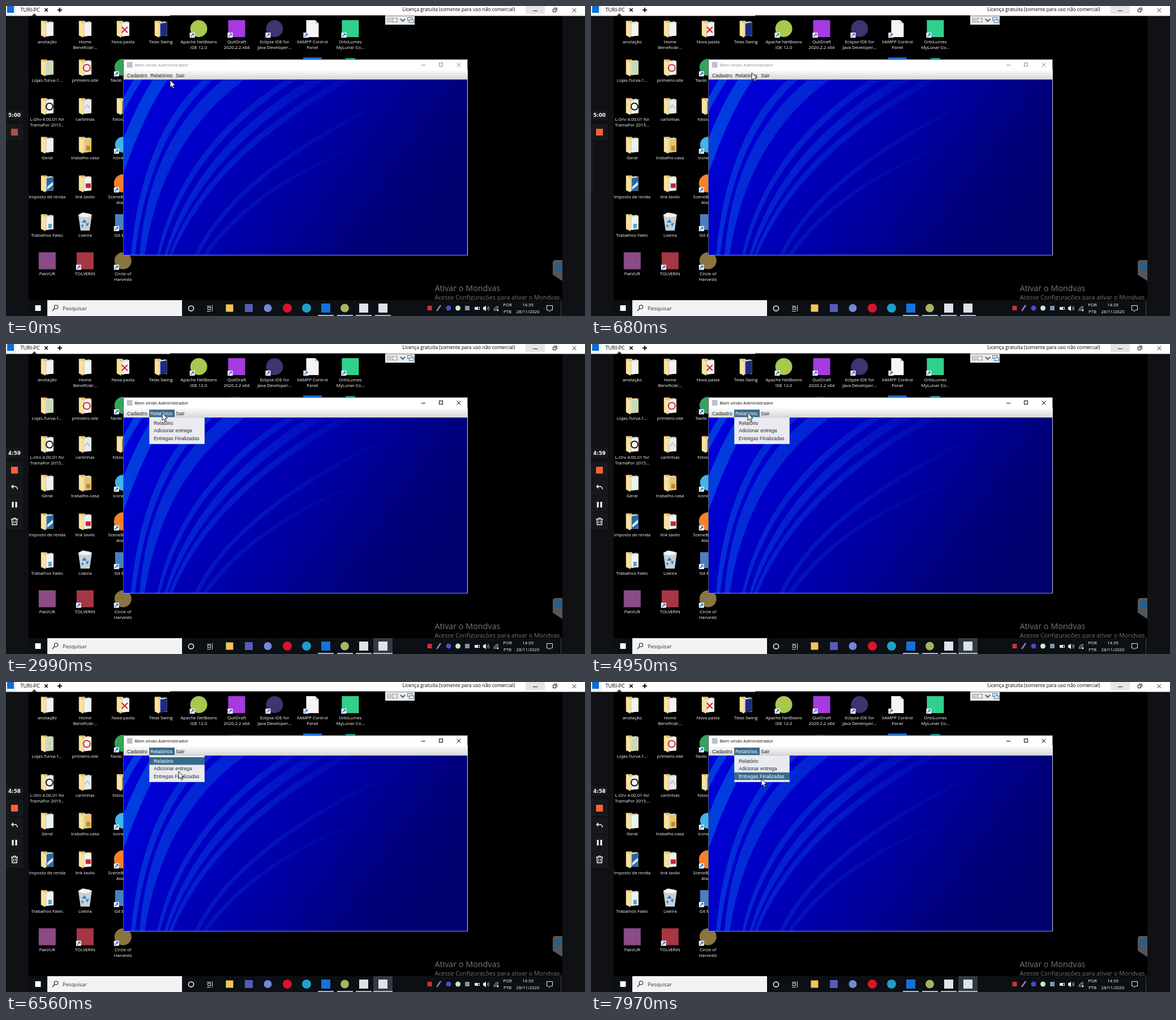
Write an HTML page with a canvas that moves like this. It is 1023 px wide and 548 px high and loops after 8 s.

```html
<!DOCTYPE html>
<html lang="pt-BR">
<head>
<meta charset="utf-8">
<title>Área de trabalho</title>
<style>
html, body { margin: 0; width: 100%; height: 100%; overflow: hidden; background: #000; }
canvas { display: block; }
</style>
</head>
<body>
<canvas id="stage" width="1023" height="548"></canvas>
<script>
const W = 1023, H = 548, LOOP = 8000;
const UI = '"Open Sans", "Noto Sans", sans-serif';
const SWING = '"Liberation Sans", Arial, sans-serif';
const screen = document.getElementById('stage').getContext('2d');
const desk = document.createElement('canvas');
desk.width = W;
desk.height = H;
let g = desk.getContext('2d');

// Drawing helpers
function rect(x, y, w, h, c) { g.fillStyle = c; g.fillRect(x, y, w, h); }
function disc(x, y, r, c) { g.fillStyle = c; g.beginPath(); g.arc(x, y, r, 0, 7); g.fill(); }
function ring(x, y, r, c, w = 1) {
  g.strokeStyle = c; g.lineWidth = w;
  g.beginPath(); g.arc(x, y, r, 0, 7); g.stroke();
}
function trace(pts) {
  g.beginPath();
  for (let i = 0; i < pts.length; i += 2) g.lineTo(pts[i], pts[i + 1]);
}
function poly(pts, c) { trace(pts); g.closePath(); g.fillStyle = c; g.fill(); }
function line(pts, c, w = 1) { trace(pts); g.strokeStyle = c; g.lineWidth = w; g.stroke(); }
function box(x, y, w, h, c) { g.strokeStyle = c; g.lineWidth = 1; g.strokeRect(x, y, w, h); }
function text(s, x, y, size, c, font = UI, align = 'left', weight = 400) {
  g.font = `${weight} ${size}px ${font}`;
  g.textAlign = align;
  g.fillStyle = c;
  g.fillText(s, x, y);
}
function square(x, y, r, c) { rect(x - r, y - r, 2 * r, 2 * r, c); }
function cross(x, y, r, c, w = 1) {
  line([x - r, y - r, x + r, y + r], c, w);
  line([x + r, y - r, x - r, y + r], c, w);
}

// Desktop icons
const colX = c => 72.8 + c * 66.95;
const rowY = r => 40 + r * 68.4;

function label(c, r, ...lines) {
  lines.forEach((s, i) => text(s, colX(c), rowY(r) + 26 + i * 10, 7.8, '#fff', UI, 'center', 500));
}
function shortcut(x, y) {
  rect(x - 16, y + 7, 9, 9, '#f4f6f8');
  line([x - 14, y + 14, x - 10, y + 10], '#1768c4', 1.5);
  poly([x - 12.5, y + 8.5, x - 8.5, y + 8.5, x - 8.5, y + 12.5], '#1768c4');
}
function folder(c, r, paper, mark, ...lines) {
  const x = colX(c), y = rowY(r);
  poly([x - 10, y - 14, x - 1, y - 14, x + 1, y - 12, x + 11, y - 12, x + 11, y + 13, x - 10, y + 13], '#e3bf63');
  poly([x - 3, y - 11, x + 8, y - 13, x + 8, y + 12, x - 3, y + 14], '#d5d8da');
  poly([x - 1, y - 9, x + 11, y - 11, x + 11, y + 12, x - 1, y + 14], paper);
  poly([x - 11, y - 14, x - 3, y - 9, x - 3, y + 16, x - 11, y + 12], '#fbe29a');
  if (mark) mark(x, y);
  label(c, r, ...lines);
}
function app(c, r, shape, size, color, ...lines) {
  const x = colX(c), y = rowY(r);
  shape(x, y, size, color);
  shortcut(x, y);
  label(c, r, ...lines);
}
function bin(x, y) {
  poly([x - 12, y - 13, x + 12, y - 13, x + 8, y + 15, x - 8, y + 15], '#c9d0d4');
  poly([x - 12, y - 13, x - 4, y - 17, x + 7, y - 15, x + 12, y - 13, x + 7, y - 9, x - 7, y - 9], '#f1f3f4');
  poly([x - 6, y + 1, x - 1, y - 5, x + 3, y + 1], '#2f83cf');
  poly([x + 1, y + 3, x + 7, y + 1, x + 4, y + 8], '#2f83cf');
  poly([x - 7, y + 4, x - 2, y + 6, x - 5, y + 10], '#2f83cf');
}

function drawIcons() {
  const paper = '#f3f3ef';
  folder(0, 0, paper, null, 'anotação');
  folder(1, 0, paper, null, 'Home', 'Beneficiár...');
  folder(2, 0, paper, (x, y) => cross(x + 3, y + 2, 5, '#d3202a', 2), 'Nova pasta');
  folder(3, 0, '#1c2c82', null, 'Telas Swing');
  folder(0, 1, '#c9d9b8', null, 'Lojas-Turva-1...');
  folder(1, 1, paper, (x, y) => ring(x + 3, y + 1, 6, '#cf2a3c', 2), 'primeiro-site');
  folder(0, 2, '#f5f5f5', (x, y) => ring(x + 4, y + 1, 6, '#161616', 2), 'L-Orv 4.00.01 for', 'TramaFor 2015...');
  folder(1, 2, '#e9ebec', (x, y) => line([x, y + 4, x + 4, y - 2, x + 9, y + 5], '#8b9296'), 'cartinhas');
  folder(2, 2, '#4c4a42', null, 'fotos casa');
  folder(0, 3, '#e9f4f1', null, 'Geral');
  folder(1, 3, '#eac46a', (x, y) => rect(x + 2, y + 2, 7, 8, '#b98b35'), 'trabalho-casa');
  folder(0, 4, '#2668a8', (x, y) => poly([x, y + 6, x + 10, y - 3, x + 10, y + 3, x, y + 11], '#dce9f3'), 'Imposto de renda');
  folder(1, 4, paper, (x, y) => rect(x + 1, y, 9, 8, '#c72534'), 'link tavilo');
  folder(0, 5, '#eef3f5', (x, y) => rect(x + 2, y + 3, 6, 8, '#5ca3c4'), 'Trabalhos Fatec');
  bin(colX(1), rowY(5));
  label(1, 5, 'Lixeira');

  app(4, 0, disc, 15, '#a9c84f', 'Apache NetBeans', 'IDE 12.0');
  app(5, 0, square, 15, '#a53be0', 'QuilDraft', '2020.2.2 x64');
  app(6, 0, disc, 15, '#3d3470', 'Eclipse IDE for', 'Java Developer...');
  const px = colX(7), py = rowY(0);
  poly([px - 11, py - 15, px + 5, py - 15, px + 11, py - 9, px + 11, py + 15, px - 11, py + 15], '#f5f5f5');
  poly([px + 5, py - 15, px + 11, py - 9, px + 5, py - 9], '#c8c8c8');
  shortcut(px, py);
  label(7, 0, 'XAMPP Control', 'Panel');
  app(8, 0, square, 15, '#31d08c', 'OrbiLumes', 'MyLunar Co...');

  app(2, 1, disc, 15, '#35a35a', 'Tavilo Linker');
  app(2, 3, disc, 14, '#43b4e8', 'icones-sis');
  app(2, 4, disc, 16, '#f5822a', 'SceneBuilder -', 'Atalho');
  app(2, 5, square, 14, '#4c7fc0', 'Git Bash');
  square(colX(0), rowY(6), 15, '#8a4b86');
  label(0, 6, 'PakVUR');
  app(1, 6, square, 15, '#a53743', 'TOLVERIN');
  app(2, 6, disc, 15, '#8a7440', 'Circle of', 'Harvests');

  rect(396, 93, 18, 2, '#333');
  rect(525, 91, 33, 4, '#1d6fd0');
  rect(600, 92, 17, 3, '#19a9a6');
}

function drawTopBar() {
  rect(0, 0, W, 17.5, '#fff');
  rect(290, 16.5, 380, 1.5, '#000');
  rect(0, 0, 18, 17, '#f0f0f0');
  square(8, 6, 6, '#0d6cd6');
  text('TURI-PC', 25.5, 10, 9.2, '#000');
  cross(71, 7, 2.7, '#000', 1.6);
  line([91, 7, 99, 7], '#000', 1.8);
  line([95, 3, 95, 11], '#000', 1.8);
  poly([45, 18, 50, 13, 55, 18], '#333');
  text('Licença gratuita (somente para uso não comercial)', 700.5, 9, 8.5, '#000', UI, 'left', 500);
  rect(918, 0, 34, 14, '#e5e5e5');
  line([931, 8.5, 939, 8.5], '#222');
  box(966.5, 5.5, 5, 5, '#222');
  line([968, 3.5, 973.5, 3.5, 973.5, 9], '#222');
  cross(1004, 7.5, 3.5, '#222');

  rect(670, 18, 52, 15, '#e9eaec');
  for (let i = 0; i < 9; i++) rect(673 + i % 3 * 3, 21 + (i / 3 | 0) * 3, 2, 2, '#a4a8ac');
  for (const [sx, sy] of [[-1, -1], [1, -1], [-1, 1], [1, 1]]) {
    const x = 687 + sx * 4, y = 25 + sy * 3.5;
    line([x - sx * 3, y, x, y, x, y - sy * 3], '#777');
  }
  line([697, 23, 701, 27, 705, 23], '#555', 1.8);
  box(709.5, 20.5, 8, 5, '#4a7aa6');
  rect(712, 24, 9, 6, '#e9eaec');
  box(712.5, 24.5, 8, 5, '#4a7aa6');
}

function drawTaskbar() {
  rect(40, 520, 943, 28, '#0c0f13');
  square(56.5, 534, 5, '#fff');
  rect(73, 520, 238, 28, '#f3f3f3');
  ring(88.5, 532, 3.2, '#222', 1.1);
  line([86, 534.5, 82, 539], '#222', 1.2);
  text('Pesquisar', 100, 538, 9.4, '#333');
  ring(327, 534.5, 4.6, '#fff', 1.5);
  box(356.5, 532.5, 5, 4, '#ddd');
  line([355, 530.5, 362, 530.5], '#ddd');
  line([355, 539.5, 362, 539.5], '#ddd');
  line([364.5, 529, 364.5, 540], '#ddd');

  square(395, 534, 6.5, '#f3c557');
  square(429, 534, 7, '#565bb8');
  disc(462.5, 534, 7, '#7289da');
  disc(497, 534, 8, '#d9142b');
  disc(531, 534, 8, '#219fc9');
  square(565, 534, 8, '#1672d8');
  disc(598.5, 534, 7.5, '#a9b35f');
  square(632, 534, 8, '#dde3e6');
  for (const x of [551, 585, 618, 652]) rect(x, 546, 28, 2, '#83c5e8');

  square(748.5, 534, 4, '#d0303a');
  line([761, 539, 768, 529], '#a979c9', 2.5);
  disc(782, 534, 4.5, '#3f51c8');
  disc(798.5, 534, 4.5, '#cfe5d3');
  square(815, 534, 4, '#7d97aa');
  box(828.5, 532.5, 8, 4, '#e8e8e8');
  rect(829, 533, 5, 4, '#e8e8e8');
  poly([843, 532, 845, 532, 848, 529.5, 848, 539.5, 845, 537, 843, 537], '#eee');
  for (const r of [3, 5.5]) {
    g.beginPath(); g.arc(848, 534.5, r, -0.8, 0.8);
    g.strokeStyle = '#ddd'; g.lineWidth = 1; g.stroke();
  }
  for (const r of [3, 5.5, 8]) {
    g.beginPath(); g.arc(870, 539, r, Math.PI, Math.PI * 1.5);
    g.stroke();
  }
  disc(869, 538, 1.3, '#fff');
  text('POR', 886, 531, 7.8, '#fff', UI, 'center');
  text('PTB', 886, 543, 7.8, '#fff', UI, 'center');
  text('14:39', 922, 531, 7.7, '#fff', UI, 'center');
  text('28/11/2020', 922, 543, 7.7, '#fff', UI, 'center');
  line([955.5, 529.5, 965.5, 529.5, 965.5, 537.5, 962, 537.5, 960, 540, 958, 537.5, 955.5, 537.5, 955.5, 529], '#eee');
  line([980.5, 521, 980.5, 548], '#444');
}

function band(x0, y0, cx, cy, x1, y1, w0, w1, color, reach) {
  const fade = g.createLinearGradient(208, 0, reach, 0);
  fade.addColorStop(0, `rgba(${color},.85)`);
  fade.addColorStop(0.5, `rgba(${color},.6)`);
  fade.addColorStop(1, `rgba(${color},0)`);
  g.fillStyle = fade;
  g.beginPath();
  g.moveTo(x0, y0);
  g.quadraticCurveTo(cx, cy, x1, y1);
  g.lineTo(x1 + w1, y1);
  g.quadraticCurveTo(cx + (w0 + w1) / 2, cy, x0 + w0, y0);
  g.fill();
}

function drawWindow() {
  rect(207, 94, 609, 347, '#5a5f70');
  rect(208, 95, 607, 18, '#fff');
  const bar = g.createLinearGradient(0, 113, 0, 130);
  bar.addColorStop(0, '#fdfdfd');
  bar.addColorStop(1, '#d5d6d9');
  rect(208, 113, 607, 17, bar);
  square(218.5, 104, 5, '#b9c2cc');
  text('Cadastro', 214, 126, 8.75, '#222', SWING);
  text('Sair', 300, 126, 8.75, '#222', SWING);

  g.save();
  g.beginPath();
  g.rect(208, 130, 607, 310);
  g.clip();
  const sky = g.createLinearGradient(208, 130, 690, 470);
  sky.addColorStop(0, '#0000dc');
  sky.addColorStop(0.3, '#0000c8');
  sky.addColorStop(0.57, '#0000a6');
  sky.addColorStop(0.84, '#00007c');
  sky.addColorStop(1, '#00006e');
  rect(208, 130, 607, 310, sky);
  band(226, 130, 210, 155, 192, 195, 15, 12, '0,70,226', 600);
  band(260, 130, 222, 185, 184, 300, 26, 22, '0,74,226', 620);
  band(348, 130, 240, 228, 221, 440, 18, 7, '4,56,218', 640);
  band(384, 130, 252, 236, 236, 440, 38, 9, '4,56,218', 640);
  band(494, 130, 308, 250, 267, 440, 20, 5, '6,48,212', 650);
  band(536, 130, 332, 255, 280, 440, 30, 5, '6,48,212', 650);
  band(590, 130, 354, 262, 288, 440, 22, 6, '6,44,208', 670);
  band(650, 175, 398, 300, 333, 440, 16, 8, '6,32,196', 690);
  band(610, 250, 430, 322, 347, 440, 14, 9, '6,28,186', 640);
  g.restore();
  rect(815, 112, 1, 329, '#cfd3e4');
  rect(207, 440, 609, 1, '#8e94bc');
}

function drawDesktop() {
  rect(0, 0, W, H, '#101114');
  rect(40, 17, 943, 531, '#000');
  drawIcons();
  text('Ativar o Mondvas', 757.5, 504, 14.3, '#777');
  g.save();
  g.beginPath();
  g.rect(0, 0, 983, H);
  g.clip();
  text('Acesse Configurações para ativar o Mondvas.', 757.5, 519, 10.65, '#777');
  g.restore();
  poly([966, 452, 969, 449, 983, 449, 983, 486, 966, 475], '#53575b');
  square(976, 461, 6, '#20608f');
  drawTaskbar();
  drawWindow();
  drawTopBar();
}

// Motion
const path = [
  [0, 290, 131], [20, 290, 131], [680, 284, 118], [840, 292, 109], [1120, 276, 122],
  [4390, 276, 122], [4410, 278, 122], [4930, 278, 122], [4950, 277, 122], [4970, 276, 122],
  [5490, 276, 122], [6230, 303, 153], [6330, 303, 153], [6560, 305, 158], [6660, 305, 158],
  [7120, 290, 170], [7220, 290, 170], [7380, 303, 171], [7660, 303, 171], [7800, 291, 170],
  [7970, 301, 171], [LOOP, 301, 171]
];
const clamp = v => Math.max(0, Math.min(1, v));
const ease = v => { v = clamp(v); return v * v * (3 - 2 * v); };

function pointer(t) {
  const i = path.findIndex(p => p[0] > t);
  const [t0, x0, y0] = path[i - 1], [t1, x1, y1] = path[i];
  const k = ease((t - t0) / (t1 - t0));
  return [Math.round(x0 + (x1 - x0) * k), Math.round(y0 + (y1 - y0) * k)];
}
function drawPointer(x, y) {
  g.save();
  g.translate(x, y);
  const arrow = [0, 0, 0, 13, 3, 10.3, 5.2, 15, 7.3, 14, 5.2, 9.5, 9, 9.3];
  poly(arrow, '#fff');
  trace(arrow);
  g.closePath();
  g.strokeStyle = '#000';
  g.lineWidth = 0.9;
  g.stroke();
  g.restore();
}

function drawRecorder(t) {
  const panel = '#17181b';
  rect(0, 184, 30, 17, panel);
  const time = t < 2780 ? '5:00' : t < 5490 ? '4:59' : '4:58';
  text(time, 4, 196, 8.8, '#fff', '"DejaVu Sans", sans-serif', 'left', 700);
  const k = clamp(t / 500), mix = (a, b) => Math.round(a + (b - a) * k);
  rect(0, 208, 30, 29, panel);
  rect(9, 217, 12, 12, `rgb(${mix(168, 255)},${mix(78, 98)},${mix(74, 48)})`);

  const slide = ease((t - 560) / 540);
  if (!slide) return;
  g.save();
  g.translate(-30 * (1 - slide), 0);
  for (const y of [239, 269, 299]) rect(0, y, 30, 29, panel);
  line([13, 249, 10, 252, 13, 255], '#fff', 1.5);
  line([10, 252, 16, 252], '#fff', 1.5);
  g.beginPath();
  g.arc(16, 256, 4, -Math.PI / 2, 0.2);
  g.stroke();
  rect(10.5, 279, 3, 10, '#fff');
  rect(16.5, 279, 3, 10, '#fff');
  line([9, 309.5, 21, 309.5], '#fff', 1.4);
  line([13, 309, 13, 307.5, 17, 307.5, 17, 309], '#fff');
  line([10.5, 310, 11, 319.5, 19, 319.5, 19.5, 310], '#fff', 1.4);
  line([13.5, 312, 13.5, 317], '#fff');
  line([16.5, 312, 16.5, 317], '#fff');
  g.restore();
}

function drawMenu(t) {
  const hover = t < 5750 ? -1 : t < 6700 ? 0 : t < 6900 ? 1 : 2;
  rect(253, 129, 98, 48, '#e9ebf0');
  box(253.5, 129.5, 97, 47, '#c4c8d0');
  ['Relatório', 'Adicionar entrega', 'Entregas Finalizadas'].forEach((s, i) => {
    const on = i === hover;
    if (on) rect(253, 133 + i * 13.4, 98, 13.4, '#39698a');
    text(s, 261, 143 + i * 13.3, 8.65, on ? '#fff' : '#2a2a2e', SWING);
  });
}

function drawFrame(t) {
  g.drawImage(desk, 0, 0);
  const active = t >= 2780, ink = active ? '#000' : '#8c8c8c';
  text('Bem vindo Administrador', 227.5, 107, 7.95, ink);
  line([734, 104.5, 741, 104.5], ink);
  box(765.5, 100.5, 6, 6, ink);
  cross(800, 104, 3.5, ink);
  if (active) {
    rect(649, 520, 34, 28, '#343a40');
    rect(649, 546, 34, 2, '#83c5e8');
    rect(253, 116, 45, 13, '#39698a');
  }
  square(666, 534, 8, '#dde3e6');
  text('Relatórios', 255, 126, 8.7, active ? '#fff' : '#222', SWING);
  if (t >= 2800) drawMenu(t);
  drawRecorder(t);
  drawPointer(...pointer(t));
}

drawDesktop();
g = screen;
const start = performance.now();
function tick(now) {
  drawFrame(Math.max(0, now - start) % LOOP);
  requestAnimationFrame(tick);
}
drawFrame(0);
requestAnimationFrame(tick);
</script>
</body>
</html>
```
